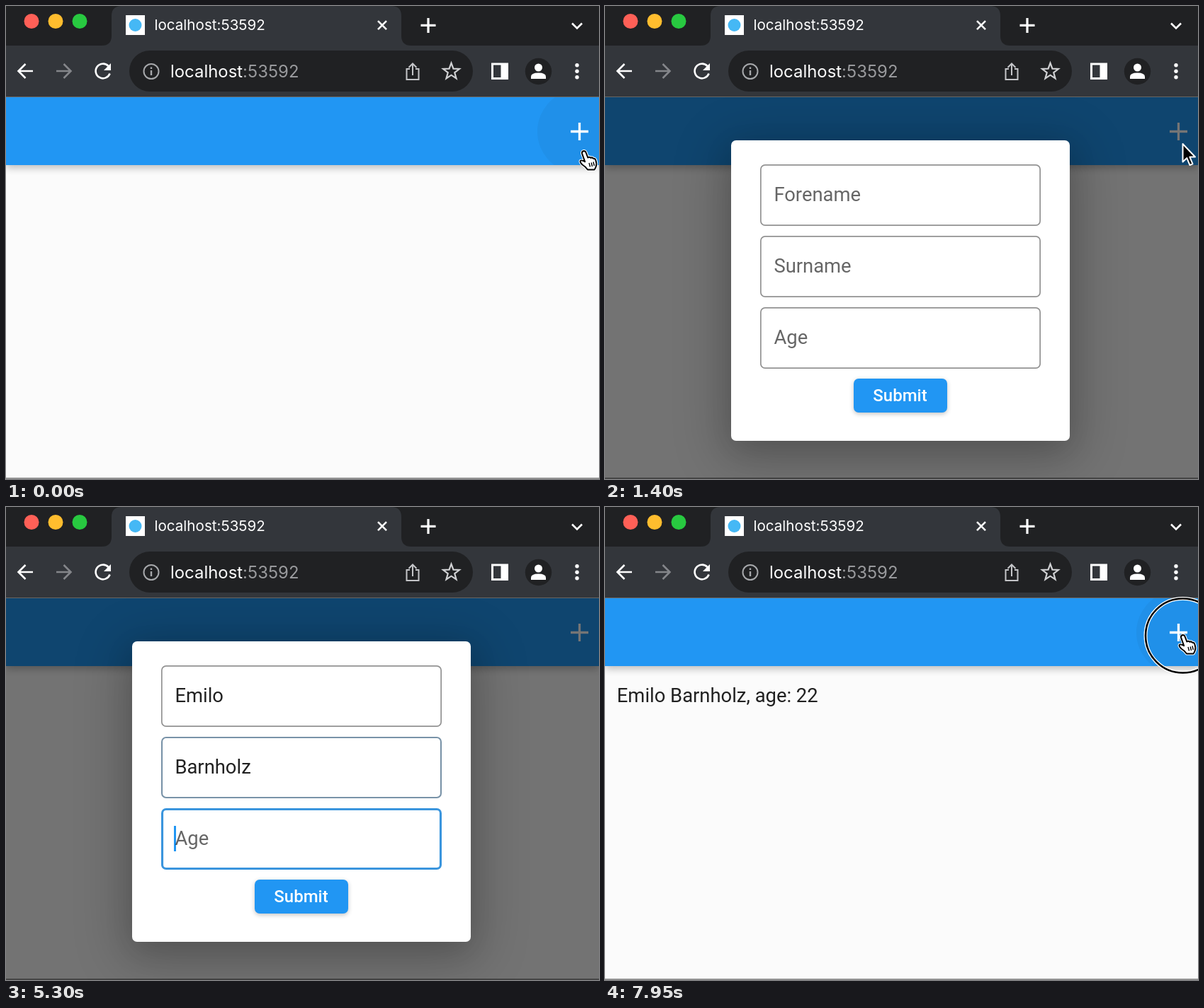
An HTML page that plays this animation: 837 by 669 pixels, repeating every 8 s.

```html
<!DOCTYPE html>
<html lang="en">
<head>
<meta charset="utf-8">
<title>Form dialog</title>
<style>
html, body { margin: 0; width: 100%; height: 100%; overflow: hidden; }
body { position: relative; background: #fbfbfb; font: 27.4px Roboto, sans-serif; color: rgba(0,0,0,.87); }
div, svg, .hint { position: absolute; }
.full { left: 0; top: 0; width: 837px; height: 669px; }
#bar { left: 0; top: 129px; width: 837px; height: 96px; background: #2196f3; overflow: hidden;
  box-shadow: 0 4px 10px rgba(0,0,0,.2), 0 2px 14px rgba(0,0,0,.08); }
#bar svg { left: 0; top: -129px; }
#row { left: 16.8px; top: 247px; line-height: 40px; white-space: pre; }
#edge { left: 0; top: 667px; width: 837px; height: 2px; background: #969696; }
#barrier { background: rgba(0,0,0,.54); }
#dialog { left: 178px; top: 190px; width: 478px; height: 425px; border-radius: 7px; background: #fff;
  box-shadow: 0 12px 40px rgba(0,0,0,.12), 0 15px 75px 12px rgba(0,0,0,.2); }
.field { left: 41px; width: 396px; height: 87.3px; box-sizing: border-box; padding: 0 0 1.6px 19.4px;
  border-radius: 7px; display: flex; align-items: center; }
.hint { left: 19.4px; color: rgba(0,0,0,.6); }
.caret { width: 3px; height: 36px; margin-left: -1px; background: #2196f3; }
#submit { left: 172.5px; top: 336.5px; width: 132px; height: 48px; border-radius: 7px; background: #2196f3; overflow: hidden;
  box-shadow: 0 2px 6px rgba(0,0,0,.24);
  color: #fff; font-size: 24px; font-weight: 500; line-height: 49px; text-align: center; }
#glow { left: 0; top: 0; width: 132px; height: 48px; background: rgba(255,255,255,.24); }
#submit b { position: relative; font-weight: 500; }
#ripple { left: 66px; top: 24px; border-radius: 50%; background: rgba(255,255,255,.08); transform: translate(-50%, -50%); }
svg text { font-family: Inter, sans-serif; fill: #fff; }
</style>
</head>
<body>
<div id="bar"><svg class="full">
  <circle id="hover" cx="809.5" cy="177.5" r="59.5" fill="#000" fill-opacity=".045"/>
  <circle id="splash" cx="809.5" cy="177.5" fill="#ccc"/>
  <path d="M797 177.500H822M809.5 165V190" stroke="#fff" stroke-width="3.3"/>
</svg></div>
<div id="row"></div>
<div id="edge"></div>
<div id="barrier" class="full"></div>
<div id="dialog">
  <div id="submit"><div id="glow"></div><div id="ripple"></div><b>Submit</b></div>
</div>

<svg width="837" height="129" style="left:0;top:0" fill="none">
  <path d="M0 0H837V129H0Z" fill="#202123"/>
  <path d="M0 56H135Q149 56 149 42V14Q149 0 163 0H544Q558 0 558 14V42Q558 56 572 56H837V129H0Z" fill="#33363b"/>
  <path d="M0 128.500H837" stroke="#696663"/>
  <circle cx="36" cy="21.500" r="10.500" fill="#ff6057"/>
  <circle cx="70" cy="21.500" r="10.500" fill="#ffbd2e"/>
  <circle cx="104" cy="21.500" r="10.500" fill="#28c940"/>
  <rect x="169" y="13" width="27" height="28" fill="#fff"/>
  <circle cx="182.500" cy="27" r="9" fill="#45b8f5"/>
  <text x="209.500" y="34.300" font-size="20.600">localhost:53592</text>
  <rect x="174" y="63" width="485" height="58" rx="29" fill="#202123"/>
  <text x="232" y="100.700" font-size="23.900">localhost<tspan fill="#9a9b9e">:53592</tspan></text>
  <g stroke="#fff" stroke-width="2.600">
    <path d="M525 21.200L537 33.200M537 21.200L525 33.200"/>
    <path d="M585.500 27.400H606.500M596 17V38" stroke-width="3.200"/>
    <path d="M799 24.500L806 31.500L813 24.500"/>
    <path d="M38 92H18M27.500 82L17.500 92L27.500 102"/>
    <path d="M71 92H91M81.500 82L91.500 92L81.500 102" stroke="#84868a"/>
    <path d="M144.500 85A10.300 10.300 0 1 0 146.600 95.500"/>
    <path d="M148 81V91H138Z" fill="#fff" stroke="none"/>
  </g>
  <g stroke="#a6a8ab" stroke-width="2">
    <circle cx="205" cy="92.500" r="10.500"/>
    <path d="M205 91V98M205 86.500V89" stroke-width="2.400"/>
    <path d="M570 89H565.500V104H582.500V89H578M574 98V82M568.500 87L574 81.500L579.500 87" stroke="#c4c5c8"/>
    <path id="star" stroke="#d0d1d3" stroke-width="2.200"/>
  </g>
  <path d="M685 80.500H709V104H685ZM688 83.500V101H698.500V83.500Z" fill="#fff" fill-rule="evenodd"/>
  <circle cx="751.500" cy="92.500" r="18.700" fill="#202123"/>
  <g fill="#fff">
    <circle cx="751.500" cy="87" r="5.500"/>
    <path d="M741 103V100Q741 94.500 751.500 94.500T762 100V103Z"/>
    <circle cx="806" cy="83.800" r="2.700"/><circle cx="806" cy="92.300" r="2.700"/><circle cx="806" cy="100.800" r="2.700"/>
  </g>
</svg>

<svg class="full"><g id="cursor" stroke-linejoin="round">
  <g id="press" fill="none">
    <circle r="52.500" stroke="#fff" stroke-width="5"/>
    <circle r="52.500" stroke="#000" stroke-width="2.600"/>
  </g>
  <g id="hand" fill="#fff">
    <path id="palm" d="M-2.500 2.500Q-3-.5 0-1Q2.400-1 3.200 1.500L5.800 8.500Q8 6.800 9.800 8.800Q12 7.600 13.400 9.800Q16 9.200 16.800 12Q18.600 17 17.400 20.500Q16.800 23 15 25.500H5.500Q3 21.500-2 18.500Q-6 14.500-4.600 12.800Q-3 11.500 1.600 14.200Z" stroke="#fff" stroke-width="4"/>
    <path id="outline" stroke="#000" stroke-width="2"/>
    <path d="M7.500 16L9 21.500M10.700 15.500L12 21M13.500 14.500L14.800 20" stroke="#000" stroke-width="1.400"/>
  </g>
  <path id="arrow" d="M0 0V25.500L5.800 20L10 30L14 28.300L9.900 18.500H17.500Z" fill="#000" stroke="#fff" stroke-width="2"/>
</g></svg>

<script>
const LOOP = 8000;
const $ = id => document.getElementById(id);
const clamp = v => Math.min(1, Math.max(0, v));
const ramp = (t, start, length) => clamp((t - start) / length);
const easeOut = (v, power) => 1 - (1 - v) ** power;
const show = (el, on) => el.style.visibility = on ? 'visible' : 'hidden';

const fields = [
  { hint: 'Forename', text: 'Emilo', focus: [1850, 2950], keys: [1950, 2150, 2350, 2550, 2700] },
  { hint: 'Surname', text: 'Barnholz', focus: [2950, 5200], keys: [3500, 3750, 3850, 4000, 4150, 4400, 4450, 4750] },
  { hint: 'Age', text: '22', focus: [5200, 6100], keys: [5650, 5850] },
];

fields.forEach((field, i) => {
  const box = field.box = document.createElement('div');
  box.className = 'field';
  box.style.top = 34.2 + 100.75 * i + 'px';
  box.innerHTML = `<span class="hint">${field.hint}</span><span></span><span class="caret"></span>`;
  [field.hintEl, field.textEl, field.caret] = box.children;
  $('dialog').append(box);
});
$('row').textContent = `${fields[0].text} ${fields[1].text}, age: ${fields[2].text}`;
$('outline').setAttribute('d', $('palm').getAttribute('d'));

const starPoints = Array.from({ length: 10 }, (_, i) => {
  const r = i % 2 ? 5 : 12, a = i * Math.PI / 5;
  return [628.5 + r * Math.sin(a), 92.7 - r * Math.cos(a)];
});
$('star').setAttribute('d', 'M' + starPoints.join('L') + 'Z');

function drawField({ text, focus: [from, to], keys, box, hintEl, textEl, caret }, t) {
  const glow = ramp(t, from, 130) - ramp(t, to, 130);
  const mix = [33, 150, 243].map(c => 146 + (c - 146) * glow);
  box.style.boxShadow = `inset 0 0 0 ${1.7 + 1.8 * glow}px rgb(${mix})`;
  textEl.textContent = text.slice(0, keys.filter(k => t >= k).length);
  hintEl.style.opacity = 1 - ramp(t, keys[0] - 30, 90);
  show(caret, t >= from && t < to);
}

function drawCursor(t) {
  const returning = t >= 7550;
  const y = returning ? 195 - 13 * ramp(t, 7550, 100) : 206 - 11 * easeOut(ramp(t, 850, 650), 3);
  const visible = t < 1850 || returning;
  const arrow = t >= 900 && t < 1850;
  $('cursor').setAttribute('transform', `translate(815.5 ${y})`);
  show($('arrow'), arrow);
  show($('hand'), visible && !arrow);
  show($('press'), (t >= 800 && t < 900) || t >= 7900);
}

function draw(t) {
  const level = ramp(t, 850, 150) - ramp(t, 6478, 100);
  $('dialog').style.opacity = easeOut(level, 1.7);
  $('barrier').style.opacity = easeOut(level, 2);
  show($('row'), t >= 6500);

  show($('hover'), t < 900 || t >= 6550);
  $('splash').setAttribute('r', 59.5 * easeOut(ramp(t, 800, 130), 2));
  $('splash').setAttribute('fill-opacity', .25 * (1 - ramp(t, 1050, 350)));

  fields.forEach(field => drawField(field, t));
  $('glow').style.opacity = ramp(t, 6080, 110);
  const size = t < 6500 ? 0 : 58 + (t - 6500) * .6;
  $('ripple').style.width = $('ripple').style.height = size + 'px';
  drawCursor(t);
}

function frame() {
  draw(performance.now() % LOOP);
  requestAnimationFrame(frame);
}
frame();
</script>
</body>
</html>
```
